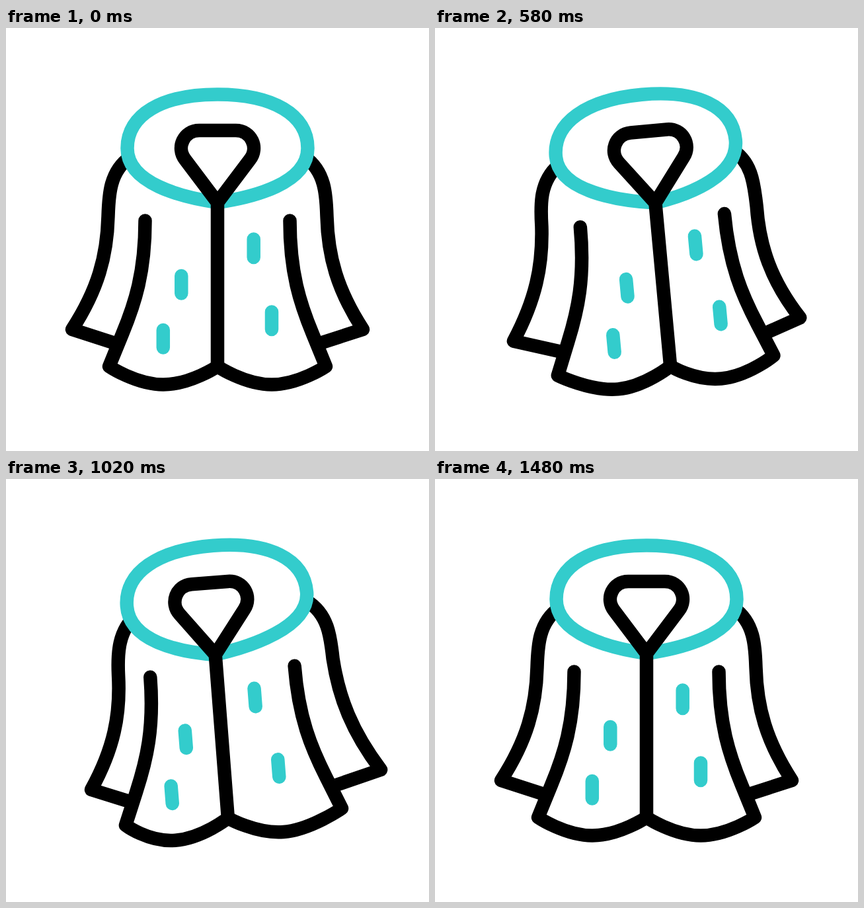
An HTML page for the animation above (2400 ms loop, 640 by 640 pixels).

```html
<!DOCTYPE html>
<html lang="en">
<head>
<meta charset="utf-8">
<title>Coat</title>
<style>
  html, body { margin: 0; width: 100%; height: 100%; overflow: hidden; background: #fff; }
  svg { display: block; width: 100%; height: 100%; }
  path { fill: none; stroke: #000; stroke-width: 20.5; stroke-linecap: round; stroke-linejoin: round; }
  .teal { stroke: #3cc; }
  #collar { fill: #fff; }
</style>
</head>
<body>
<svg viewBox="0 0 640 640">
  <g id="coat">
    <path id="sleeves"/>
    <path id="fronts"/>
    <path id="collar" class="teal"/>
    <g id="middle">
      <path class="teal" d="M265.3 375v26.5M237.8 457v26.5M374.7 319.5v27.5M402 429.5v26.5"/>
      <path d="M320 512V264L271 199C257 181 269 155 292.5 155H347.5C371 155 383 181 369 199L320 264"/>
    </g>
  </g>
</svg>
<script>
const LOOP = 2400, STEP = 20, CX = 320, PIVOT_Y = 195;

// [ms, value]
const LEAN = [[0, 0], [200, -9.4], [430, -20], [735, 10.2], [880, 1.6], [1040, -4.6], [1160, 0], [1260, 2.2], [1480, 0]];
const TURN = [[0, 0], [200, 11.3], [430, 23.2], [720, -14.5], [840, -23.4], [880, -22.4], [1140, 0]];

// Smooth curve through the keys that never overshoots them
function sample(keys, t) {
  const last = keys.length - 1;
  if (t >= keys[last][0]) return keys[last][1];
  const rate = i => (keys[i + 1][1] - keys[i][1]) / (keys[i + 1][0] - keys[i][0]);
  const slope = i => {
    if (i === 0 || i === last) return 0;
    const a = rate(i - 1), b = rate(i);
    return a * b > 0 ? 2 * a * b / (a + b) : 0;
  };
  let i = 0;
  while (t >= keys[i + 1][0]) i++;
  const [t0, v0] = keys[i], [t1, v1] = keys[i + 1];
  const d = t1 - t0, u = (t - t0) / d, w = 1 - u;
  return v0 * w * w * (1 + 2 * u) + v1 * u * u * (3 - 2 * u)
    + d * u * w * (slope(i) * w - slope(i + 1) * u);
}

const el = id => document.getElementById(id);
const coat = el('coat'), sleeves = el('sleeves'), fronts = el('fronts'),
      collar = el('collar'), middle = el('middle');

// side: -1 left, 1 right; x is measured outwards from the centre line
function sleeve(side, lean, turn) {
  const near = side * turn > 0;
  const mid = near ? -0.93 * turn : -0.3 * turn;
  const top = mid - (near ? 0.5 : 0.15) * lean;
  const tip = near ? -1.21 * turn + 0.51 * lean : -0.85 * turn;
  const drop = side > 0 ? 0.5 * Math.max(0, -lean) : -0.35 * Math.abs(lean);
  const p = (x, y, dx = 0) => `${CX + side * x + dx} ${y} `;
  return 'M' + p(132, 195, top)
    + 'C' + p(163, 217, top) + p(164.5, 252, mid) + p(165.5, 285, mid)
    + 'C' + p(167, 345, mid + (tip - mid) * 0.6) + p(181, 396 + drop * 0.7, tip)
    + p(220, 456 + drop, tip)
    + 'L' + p(155, 477);
}

function front(side, turn, drop) {
  const p = (x, y, dx = 0, dy = 0) => `${CX + side * x + dx} ${y + dy} `;
  // The right hem hangs still while the coat swings towards it
  const still = side > 0 && turn > 0;
  const hem = x => p(x, 539.5, still ? 0 : turn, still ? 0 : drop);
  const seam = p(0, 512, turn, drop);
  return 'M' + p(109.5, 291.5)
    + 'C' + p(109.5, 370) + p(125, 417) + p(144, 463)
    + 'L' + p(164, 512)
    + 'C' + p(164, 512) + hem(123) + hem(82)
    + 'C' + hem(41) + seam + seam;
}

function collarPath(lean, turn, drop) {
  const sway = -0.05 * lean * Math.abs(lean);
  const p = (x, y) => `${CX + x} ${y} `;
  const v = (x, y) => p(x + turn, y + drop);
  const rim = x => p(x + sway, 100.5);
  return 'M' + v(0, 264)
    + 'C' + v(-55, 256) + p(-136.5, 235) + p(-136.5, 182)
    + 'C' + p(-136.5, 131) + rim(-84) + rim(0)
    + 'C' + rim(84) + p(136.5, 131) + p(136.5, 182)
    + 'C' + p(136.5, 235) + v(55, 256) + v(0, 264) + 'Z';
}

function draw(t) {
  const lean = sample(LEAN, t), turn = sample(TURN, t);
  const drop = 0.28 * Math.abs(lean);
  coat.setAttribute('transform', `rotate(${lean} ${CX} ${PIVOT_Y})`);
  middle.setAttribute('transform', `translate(${turn} ${drop})`);
  sleeves.setAttribute('d', sleeve(-1, lean, turn) + sleeve(1, lean, turn));
  fronts.setAttribute('d', front(-1, turn, drop) + front(1, turn, drop));
  collar.setAttribute('d', collarPath(lean, turn, drop));
}

const start = performance.now();
function tick() {
  const t = (performance.now() - start) % LOOP;
  draw(Math.floor(t / STEP) * STEP);
  requestAnimationFrame(tick);
}
draw(0);
requestAnimationFrame(tick);
</script>
</body>
</html>
```
